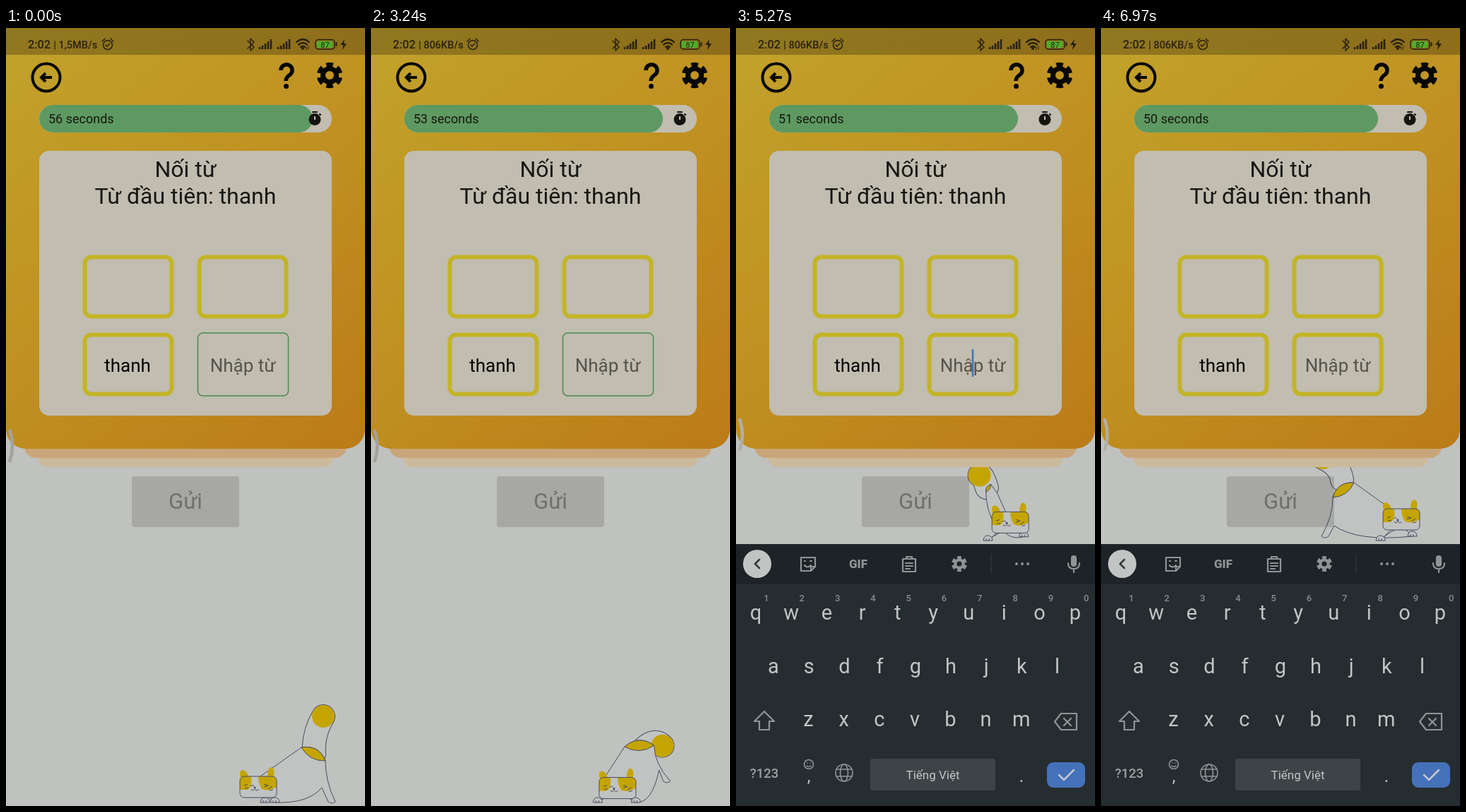
Write an HTML page that moves like this. It is 508x1102 px and loops after 7000 ms.

```html
<!DOCTYPE html>
<html lang="vi">
<head>
<meta charset="utf-8">
<style>
html, body { margin: 0; height: 100%; overflow: hidden; background: #c0c2bf; }
svg { display: block; width: 508px; height: 1102px; font-family: Roboto, sans-serif; }
.line { fill: none; stroke: currentColor; stroke-linecap: round; stroke-linejoin: round; }
.mid { text-anchor: middle; }
.cell { fill: none; stroke: #c3b427; stroke-width: 6; }
.ink { stroke: #4b4b63; stroke-width: 1; stroke-linejoin: round; }
.fur { fill: #c1c3c2; }
.patch { fill: #c4a500; }
</style>
</head>
<body>
<svg viewBox="0 0 508 1102">
<defs>
  <linearGradient id="gold" gradientUnits="userSpaceOnUse" x1="30" y1="0" x2="480" y2="590">
    <stop stop-color="#c2a22b"/><stop offset=".5" stop-color="#c09122"/><stop offset="1" stop-color="#bc7c18"/>
  </linearGradient>
  <clipPath id="below"><path d="M0 622H508V1102H0z"/></clipPath>
  <clipPath id="skull"><rect x="-26" y="-15" width="52" height="30" rx="6"/></clipPath>
  <g id="gear" fill="none" stroke="currentColor">
    <circle r="9.5" stroke-width="7"/>
    <circle r="14.5" stroke-width="7.5" pathLength="60" stroke-dasharray="6 4" stroke-dashoffset="-2"/>
  </g>
  <path id="signal" d="M1 30v-3M5 30v-5M9 30v-8M13 30v-11M17 30v-14" stroke="currentColor" stroke-width="2.6"/>
  <g id="face">
    <path class="patch" d="M-25-13q-3-9 2-11 6 0 9 9zM13-15q0-12 5-13 6 1 4 13z"/>
    <rect class="fur" x="-26" y="-15" width="52" height="30" rx="6"/>
    <path class="patch" clip-path="url(#skull)" d="M-26-15H-10Q-8 0-15 4H-26zM0-15H26V0Q14 7 5 3 0-5 0-15z"/>
    <rect class="ink" fill="none" x="-26" y="-15" width="52" height="30" rx="6"/>
    <path class="ink" fill="none" d="M-20-2l5-2M-19 2l5-1M8-4l6 2-6 2M-11-1q3-3 5 0M-10 3q2 4 5 0 3 4 6 0M14 3l6-4M16 5l5-1"/>
    <circle cx="-5" cy="1" r="1.5" fill="#4b4b63"/>
  </g>
</defs>

<g id="cat">
  <path id="tailEdge" class="line" color="#4b4b63" stroke-width="34"/>
  <path id="tail" class="line" color="#c1c3c2" stroke-width="32"/>
  <circle id="tip" class="patch" r="16"/>
  <path id="body" class="ink fur"/>
  <path id="rump" class="ink patch"/>
  <path id="paws" class="ink fur"/>
  <g id="smear"><use href="#face" x="9" y="-51"/><use href="#face" x="10" y="-34"/><use href="#face" x="5" y="-17"/></g>
  <use id="head" href="#face"/>
</g>

<rect x="45" y="570" width="418" height="52" rx="14" fill="#cbbb9c"/>
<rect x="26" y="560" width="456" height="49" rx="16" fill="#c9a679"/>
<path d="M0 0H508V568a28 28 0 0 1-28 28H28a28 28 0 0 1-28-28z" fill="url(#gold)"/>
<path d="M0 0H508V38H0z" fill-opacity=".26"/>

<g color="#29220f" fill="#29220f">
  <text x="31" y="29" font-size="16.3" font-weight="500">2:02 <tspan font-size="14.5">| <tspan id="speed"></tspan></tspan></text>
  <g class="line" stroke-width="1.5">
    <circle cx="144" cy="24" r="6.5"/><path d="M141 24l2 2 4-4M136 19l4-4M152 19l-4-4"/>
    <path d="M342 18l9 9-5 5V15l5 5-9 9"/>
    <rect x="438" y="16.5" width="27" height="13.5" rx="4"/><path d="M467.500 21v4" stroke-width="2"/>
    <path d="M411 20q9-8 18 0M414 23.500q6-5 12 0M417 27q3-2.500 6 0" stroke-width="2.3"/>
    <path id="traffic" d="M425 27v4M428 26v4" stroke-width="1"/>
  </g>
  <use href="#signal" x="358"/><use href="#signal" x="384"/>
  <circle cx="420" cy="29" r="2"/>
  <rect x="440" y="18.500" width="22" height="9.500" rx="2" fill="#4fae2c"/>
  <text class="mid" x="451.500" y="27.500" font-size="11">87</text>
  <path d="M479 16l-6 8h4l-1 7 6-9h-4z"/>
</g>

<g class="line" color="#070704" stroke-width="4">
  <circle cx="57" cy="70" r="19.500"/><path d="M65 70H51M56 64l-6 6 6 6" stroke-linecap="butt" stroke-linejoin="miter"/>
  <path d="M389 60a8 8 0 1 1 13 6q-6 4-6 9" stroke-width="5.500" stroke-linecap="butt"/>
</g>
<circle cx="396.500" cy="82.500" r="3.500"/>
<use href="#gear" transform="translate(458 67)" color="#070704"/>

<rect x="47" y="109" width="414" height="39" rx="19.500" fill="#c1bdb0"/>
<rect id="bar" x="47" y="109" height="39" rx="19.500" fill="#5e9962"/>
<text id="seconds" x="60" y="135" font-size="18" fill="#16190f"></text>
<circle cx="437" cy="129.500" r="8.500" fill="#151510"/>
<path class="line" color="#151510" stroke-width="2.200" d="M434 119h6M444 122l1 1"/>
<path d="M437 125v5" stroke="#c1bdb0" stroke-width="2"/>

<rect x="47" y="174" width="414" height="375" rx="14" fill="#c1bdb0"/>
<g class="mid" fill="#171714">
  <text x="254" y="211" font-size="32">Nối từ</text>
  <text x="254" y="248.500" font-size="32">Từ đầu tiên: thanh</text>
  <text x="172" y="487" font-size="26" fill="#000">thanh</text>
  <text x="335" y="487" font-size="26" fill="#55534d">Nhập từ</text>
</g>
<rect class="cell" x="111.500" y="324.500" width="123" height="84" rx="9"/>
<rect class="cell" x="273.500" y="324.500" width="123" height="84" rx="9"/>
<rect class="cell" x="111.500" y="434.500" width="123" height="84" rx="9"/>
<rect id="focused" class="cell" x="273.500" y="434.500" width="123" height="84" rx="9"/>
<rect id="idle" x="271.500" y="432" width="128" height="89" rx="7" fill="none" stroke="#4a8a52" stroke-width="1.500"/>
<path id="caret" d="M335 455v39" stroke="#3b75b5" stroke-width="2.500"/>

<rect x="178" y="635" width="152" height="72" rx="4" fill-opacity=".135"/>
<text class="mid" x="254" y="681" font-size="31" fill="#6f706e">Gửi</text>
<path id="handle" class="line" stroke-width="4.500" d="M5.500 571q7 21 0 42"/>

<g id="keyboard">
  <path d="M0 731H508V1102H0z" fill="#262d30"/>
  <path d="M0 731H508V788H0z" fill="#1d2326"/>
  <circle cx="30" cy="759" r="20" fill="#c2c4c3"/>
  <path class="line" color="#33383a" stroke-width="2.500" d="M33 753l-6 6 6 6"/>
  <g class="line" color="#8f9496" stroke-width="2.200">
    <path d="M92 750h20v13l-6 6H92zM112 763h-6v6M97 761q4 5 9 0M97 755h1M105 755h2"/>
    <path d="M236 752h18v18h-18zM241 752v-3h8v3M240 758h10M240 762h10M240 766h6"/>
    <rect x="475" y="748" width="6" height="14" rx="3" fill="currentColor"/><path d="M470 758q0 8 8 8t8-8M478 766v5"/>
    <path d="M40 968l14 14h-7v12H33v-12h-7z"/>
    <path d="M460 971h22v23h-22l-9-11.500zM464 978l10 10M474 978l-10 10"/>
    <g stroke-width="1.600">
      <circle cx="103" cy="1043" r="6.500"/><path d="M100 1045q3 3 6 0M101 1041h0M105 1041h0"/>
      <circle cx="153" cy="1055" r="12"/><ellipse cx="153" cy="1055" rx="5.500" ry="12"/><path d="M142 1050h22M142 1060h22"/>
    </g>
    <path d="M397 759h0M405 759h0M413 759h0" stroke-width="4"/>
  </g>
  <use href="#gear" transform="translate(316 759) scale(.6)" color="#8f9496"/>
  <path d="M361 745v28" stroke="#343a3d"/>
  <rect x="190" y="1035" width="177" height="45" rx="3" fill="#3d4447"/>
  <rect x="440" y="1040" width="54" height="36" rx="9" fill="#4471b9"/>
  <path class="line" color="#c2c8d0" stroke-width="2.500" d="M457 1058l7 7 14-14"/>
  <g id="keys" class="mid"></g>
</g>
</svg>

<script>
const $ = id => document.getElementById(id);
const set = (id, attrs) => { for (const k in attrs) $(id).setAttribute(k, attrs[k]); };
const show = (id, on) => set(id, { visibility: on ? 'visible' : 'hidden' });

const label = (s, x, y, size, fill = '#c3c5c5', weight = 400) =>
  $('keys').insertAdjacentHTML('beforeend',
    `<text x="${x}" y="${y}" font-size="${size}" fill="${fill}" font-weight="${weight}">${s}</text>`);

[['qwertyuiop', 28, 838], ['asdfghjkl', 53, 914], ['zxcvbnm', 102.5, 989]].forEach(([row, x, y]) =>
  [...row].forEach((c, i) => label(c, x + i * 50.2, y, 29)));
for (let i = 0; i < 10; i++) label((i + 1) % 10, 43 + i * 50.3, 812, 13, '#868b8d', 500);
label('GIF', 173, 765, 17, '#8f9496', 900);
label('?123', 40, 1062, 18.5, '#9da1a3', 500);
label(',', 103, 1068, 24);
label('.', 404, 1068, 26);
label('Tiếng Việt', 278.5, 1064, 17);

// time; shoulder, rump front, rump back, heel, groin, near paw; far paw x; head; tail base, bend, tip
const poses = [
  [640, 360,1060, 418,1019, 452,1038, 466,1096, 447,1076, 380,1097, 366, 357,1075, 436,1028, 434,1000, 449,975],
  [1360, 345,1064, 386,1022, 428,1028, 439,1083, 426,1066, 372,1096, 322, 348,1078, 421,1026, 441,988, 404,981],
  [2390, 330,1066, 368,1020, 414,1020, 434,1074, 418,1057, 375,1097, 320, 347,1081, 400,1026, 425,1020, 434,1033],
  [4450, 333,1052, 343,1015, 378,1010, 406,1055, 390,1041, 373,1097, 321, 352,1069, 362,1011, 362,980, 376,989],
  [5910, 395,1015, 373,1019, 337,1041, 339,1090, 352,1076, 430,1088, 380, 413,1073, 350,1030, 340,1018, 323,1015],
  [6970, 400,1045, 358,1015, 328,1036, 312,1091, 330,1076, 440,1091, 395, 425,1067, 341,1011, 338,990, 314,980]
];

function poseAt(t) {
  const i = poses.findIndex(p => p[0] > t);
  if (i < 0) return poses.at(-1);
  if (!i) return poses[0];
  const a = poses[i - 1], b = poses[i];
  const p = (t - a[0]) / (b[0] - a[0]), e = p * p * (3 - 2 * p);
  return a.map((v, k) => v + (b[k] - v) * e);
}

function drawCat(t) {
  const [, sx, sy, ax, ay, bx, by, fx, fy, gx, gy, px, py, qx, hx, hy, ...tail] = poseAt(t);
  const side = bx > ax ? 1 : -1;
  const mx = (ax + bx) / 2, my = (ay + by) / 2;
  const nx = (by - ay) * side, ny = -Math.abs(bx - ax);
  const top = `${mx + nx * .4} ${my + ny * .4}`;
  const toe = fx + (hx > fx ? 10 : -10);
  const curve = `M${tail[0]} ${tail[1]}Q${tail.slice(2)}`;
  set('tailEdge', { d: curve });
  set('tail', { d: curve });
  set('tip', { cx: tail[4], cy: tail[5] });
  set('body', { d: `M${sx} ${sy}L${ax} ${ay}Q${top} ${bx} ${by}Q${bx} ${(by + fy) / 2} ${fx} ${fy}` +
    `q${(toe - fx) / 2} 4 ${toe - fx} 0L${gx} ${gy}Q${gx * .7 + px * .3} 1099 ${px} ${py}Q${hx} ${hy} ${qx} 1097L${hx} ${hy}z` });
  set('rump', { d: `M${ax} ${ay}Q${top} ${bx} ${by}Q${mx - nx * .3} ${my - ny * .3} ${ax} ${ay}`, 'stroke-width': .8 });
  const paw = (x, y) => `M${x - 6} ${y}q1-8 7-7 6 1 6 7zm4 0v-3m4 3v-3`;
  set('paws', { d: paw(px, py) + paw(qx, 1097) });
  const at = { transform: `translate(${hx} ${hy})` };
  set('head', at);
  set('smear', at);
  show('smear', t > 5860 && t < 5960);
}

function draw(now) {
  const t = now % 7000;
  const left = t < 1100 ? 56 : 55 - Math.floor((t - 1100) / 1000);
  $('seconds').textContent = left + ' seconds';
  set('bar', { width: 387 - (56 - left) * 7 });
  $('speed').textContent = t < 3100 ? '1,5MB/s' : '806KB/s';
  show('traffic', t < 3100 || t > 4900);

  const focus = t >= 3570;
  show('focused', focus);
  show('idle', !focus);
  show('caret', t > 4100 && t % 1000 > 100 && t % 1000 < 600);
  set('handle', { color: focus ? '#b0afa7' : '#a3a29b', transform: `translate(0 ${focus ? -16 : 0})` });

  const rise = Math.min(1, Math.max(0, (t - 3570) / 260));
  set('keyboard', { transform: `translate(0 ${371 * (1 - rise) ** 2})` });

  drawCat(t);
  const lifted = rise === 1;
  set('cat', { transform: `translate(0 ${lifted ? -371 : 0})` });
  requestAnimationFrame(draw);
}
// keep the lifted cat under the card edge
$('cat').outerHTML = `<g clip-path="url(#below)">${$('cat').outerHTML}</g>`;
draw(performance.now());
</script>
</body>
</html>
```
